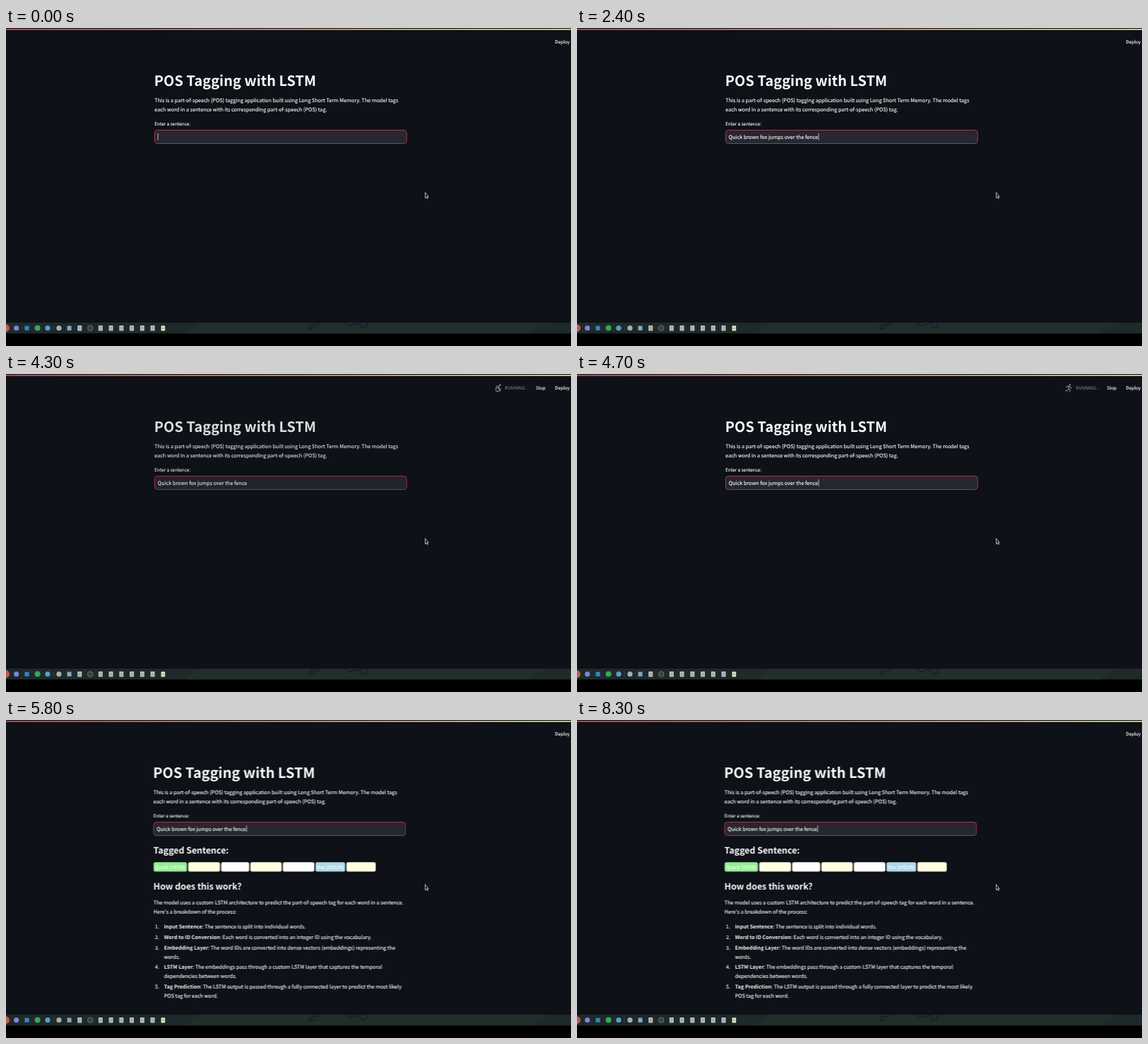
Animation of 800 by 450 pixels, one loop 8400 ms. Source, as an HTML page:

```html
<!DOCTYPE html>
<html lang="en">
<head>
<meta charset="utf-8">
<title>POS Tagging with LSTM</title>
<style>
  html, body { margin: 0; width: 100%; height: 100%; overflow: hidden; background: #000; }
  svg { display: block; width: 100vw; height: 100vh; }
  text {
    font-family: "Noto Sans CJK JP", "Noto Sans CJK SC", "Noto Sans CJK KR", "Noto Sans CJK TC", "Noto Sans CJK", "Open Sans", sans-serif;
    font-size: 7.26px;
    fill: #fafafa;
    stroke: #fafafa;
    stroke-width: .13px;
    text-rendering: geometricPrecision;
    white-space: pre;
  }
  .b { font-weight: 600; stroke: none; }
  .small { font-size: 6.36px; }
  .h1 { font-size: 19.98px; font-weight: 700; stroke: none; }
  .h3 { font-size: 12.45px; font-weight: 600; letter-spacing: -.005em; stroke: none; }
  .grey { fill: #8b8e96; stroke: none; }
  .icon { fill: none; stroke: #85888f; stroke-width: 1.1; stroke-linecap: round; stroke-linejoin: round; }
  .icon .dot { fill: #85888f; stroke: none; }

  /* One 8.4 s clock drives every hard change. */
  .page, .caret, .blink, .typed, .results, .status, .wheel, .run { animation: 8.4s step-end infinite; }
  .page { animation-name: shift; }
  .stale { animation: stale 8.4s linear infinite; }
  .caret { animation-name: jump; }
  .blink { animation-name: blink; }
  .typed { animation-name: typed; }
  .results { animation-name: results; }
  .status { animation-name: status; }
  .wheel { animation-name: wheel; }
  .run { animation-name: run; }

  @keyframes shift { 0% { transform: none; } 56.9%, 100% { transform: translateX(-1.5px); } }
  @keyframes stale {
    0%, 47.5% { opacity: 1; }
    51.19% { opacity: .88; }
    53.3% { opacity: .85; }
    53.6%, 100% { opacity: 1; }
  }
  @keyframes jump { 0% { transform: none; } 25.95%, 100% { transform: translateX(127px); } }
  @keyframes blink {
    0%, 11.67%, 25.95%, 40.24%, 54.52%, 68.81%, 83.1%, 97.38%, 100% { opacity: 1; }
    4.52%, 18.81%, 34.29%, 47.38%, 61.67%, 75.95%, 90.24% { opacity: 0; }
  }
  @keyframes typed { 0% { opacity: 0; } 25.95%, 100% { opacity: 1; } }
  @keyframes results { 0% { opacity: 0; } 56.9%, 100% { opacity: 1; } }
  @keyframes status { 0% { opacity: 0; } 47.5% { opacity: 1; } 56.9%, 100% { opacity: 0; } }
  @keyframes wheel { 0% { opacity: 1; } 53.33%, 100% { opacity: 0; } }
  @keyframes run { 0% { opacity: 0; } 53.33%, 100% { opacity: 1; } }
</style>
</head>
<body>
<svg viewBox="0 0 800 450" preserveAspectRatio="none">
  <defs>
    <linearGradient id="stripe">
      <stop offset="0" stop-color="#c43c44"/>
      <stop offset="1" stop-color="#c8c868"/>
    </linearGradient>
    <clipPath id="strip"><rect y="417" width="800" height="15.3"/></clipPath>
    <g id="doc">
      <rect x="-3" y="-3.7" width="6" height="7.4" rx=".6" fill="#c2c5c5"/>
      <path d="M-1.8-1.6h3.6M-1.8 0h3.6M-1.8 1.6h3.6" stroke="#7f8585" stroke-width=".7"/>
    </g>
  </defs>

  <rect width="800" height="417" fill="#0e1117"/>
  <rect y="1" width="800" height="2" fill="url(#stripe)"/>

  <text class="small" x="777.3" y="22.4">Deploy</text>
  <g class="status">
    <g class="icon wheel">
      <circle class="dot" cx="699.6" cy="15.6" r="1.3"/>
      <circle cx="696.2" cy="22" r="2.7"/>
      <path d="M693.6 18.4L695.6 16.7L698.4 17.6L696.6 20.4L700 20.8L699.8 24"/>
    </g>
    <g class="icon run">
      <circle class="dot" cx="698" cy="15.5" r="1.2"/>
      <path d="M692.8 19.2L693.8 17.4L697 17.4L698.6 19.3L700.6 19.6M697 17.4L695.8 21L698 22.4L697.9 25.2M695.8 21L694.8 23.4L692 23.6"/>
    </g>
    <text class="small grey" x="706.2" y="22.4">RUNNING...</text>
    <text class="small" x="750.3" y="22.4">Stop</text>
  </g>

  <g class="page">
    <g class="stale">
      <text class="h1" x="209.8" y="82">POS Tagging with LSTM</text>
      <text x="210.3" y="104.6">This is a part-of-speech (POS) tagging application built using Long Short Term Memory. The model tags</text>
      <text x="210.3" y="117.6">each word in a sentence with its corresponding part-of-speech (POS) tag.</text>
      <text class="small" x="210.3" y="137.8">Enter a sentence:</text>
      <rect x="210.5" y="144.5" width="356.8" height="19" rx="4" fill="#262730" stroke="#a83646"/>
      <text class="typed" x="214.8" y="156.8">Quick brown fox jumps over the fence</text>
    </g>
    <g class="caret"><rect class="blink" x="214.7" y="149.2" width=".8" height="9.6" fill="#dcdde0"/></g>

    <g class="results">
      <text class="h3" x="210.3" y="189.4">Tagged Sentence:</text>
      <g transform="translate(1.5 201.2)">
        <rect x="209" width="47.2" height="13.3" rx="2.5" fill="#90ee90"/>
        <rect x="258" width="45" height="13.3" rx="2.5" fill="#ffffe0"/>
        <rect x="304.7" width="39.6" height="13.3" rx="2.5" fill="#fff"/>
        <rect x="346" width="44.3" height="13.3" rx="2.5" fill="#ffffe0"/>
        <rect x="392" width="44.5" height="13.3" rx="2.5" fill="#fff"/>
        <rect x="438.2" width="42" height="13.3" rx="2.5" fill="#add8e6"/>
        <rect x="482" width="41.5" height="13.3" rx="2.5" fill="#ffffe0"/>
        <text x="211" y="9.4">Quick (VERB)</text>
        <text x="440.2" y="9.4">the (NOUN)</text>
      </g>

      <text class="h3" x="210.3" y="240">How does this work?</text>
      <text x="210.3" y="261.2">The model uses a custom LSTM architecture to predict the part-of-speech tag for each word in a sentence.</text>
      <text x="210.3" y="274.2">Here's a breakdown of the process:</text>

      <text x="212.5" y="295.4">1.</text>
      <text x="225.2" y="295.4"><tspan class="b">Input Sentence</tspan>: The sentence is split into individual words.</text>
      <text x="212.5" y="309.9">2.</text>
      <text x="225.2" y="309.9"><tspan class="b">Word to ID Conversion</tspan>: Each word is converted into an integer ID using the vocabulary.</text>
      <text x="212.5" y="324.5">3.</text>
      <text x="225.2" y="324.5"><tspan class="b">Embedding Layer</tspan>: The word IDs are converted into dense vectors (embeddings) representing the</text>
      <text x="225.2" y="337.5">words.</text>
      <text x="212.5" y="352.1">4.</text>
      <text x="225.2" y="352.1"><tspan class="b">LSTM Layer</tspan>: The embeddings pass through a custom LSTM layer that captures the temporal</text>
      <text x="225.2" y="365.1">dependencies between words.</text>
      <text x="212.5" y="379.8">5.</text>
      <text x="225.2" y="379.8"><tspan class="b">Tag Prediction</tspan>: The LSTM output is passed through a fully connected layer to predict the most likely</text>
      <text x="225.2" y="392.8">POS tag for each word.</text>
    </g>
  </g>

  <path d="M593.4 232.6V240.6L595.2 239L596.4 241.4L597.5 240.9L596.4 238.6H598.2Z" fill="#15181d" stroke="#dcdcdc" stroke-width=".8" stroke-linejoin="round"/>

  <!-- Taskbar -->
  <g clip-path="url(#strip)">
    <rect y="417" width="800" height="15.3" fill="#1e2a2a"/>
    <path d="M255 432.3L272 417H765L740 432.3Z" fill="#202e2c"/>
    <g fill="none" stroke="#171d20" stroke-width="1.4">
      <path d="M428 426L433 419L439 421L444 417.5M430 426L437 424"/>
      <path d="M481 417.5L486 421.5L499 418"/>
      <circle cx="506" cy="419.5" r="5" fill="#272a2f"/>
    </g>
    <circle cx="-.5" cy="424.7" r="5.5" fill="#c2574c"/>
    <circle cx="14.7" cy="424.7" r="3.6" fill="#7a84dc"/>
    <rect x="26.5" y="421.6" width="6.2" height="6.2" fill="#3585bd"/>
    <circle cx="44.6" cy="424.5" r="4" fill="#3da457"/>
    <circle cx="59" cy="424.7" r="3.6" fill="#559fca"/>
    <path d="M67.2 421v7.4" stroke="#4a5556" stroke-width=".6"/>
    <circle cx="75" cy="424.7" r="3.6" fill="#a9adaf"/>
    <rect x="86.6" y="421.5" width="6" height="6.4" fill="#80a8c8"/>
    <circle cx="119.3" cy="424.7" r="3.8" fill="#3a3d40" stroke="#85898b" stroke-width=".7"/>
    <use href="#doc" x="104.3" y="424.8"/>
    <use href="#doc" x="133.9" y="424.8"/>
    <use href="#doc" x="148.6" y="424.8"/>
    <use href="#doc" x="163.4" y="424.8"/>
    <use href="#doc" x="178.1" y="424.8"/>
    <use href="#doc" x="192.9" y="424.8"/>
    <use href="#doc" x="207.6" y="424.8"/>
    <rect x="219.6" y="421.2" width="5.6" height="7.4" rx=".7" fill="#dfe2cf"/>
    <path d="M221 425h2.8" stroke="#8ba05c" stroke-width="1.4"/>
  </g>
</svg>
</body>
</html>
```
